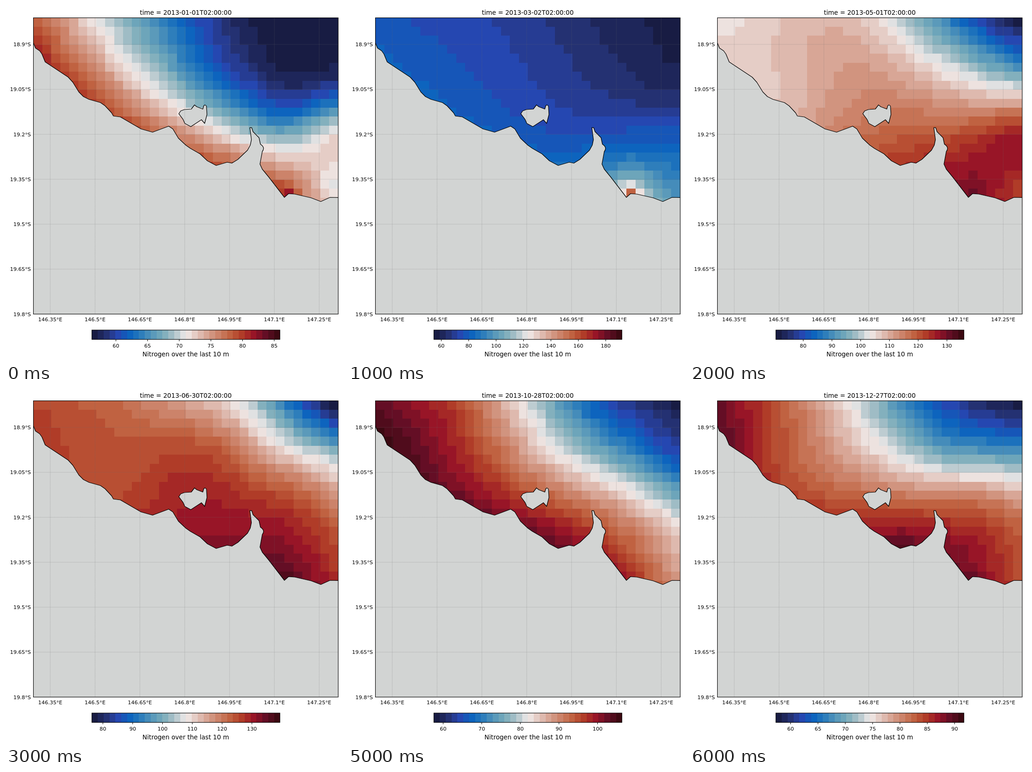
An HTML page with a canvas that plays this animation: 729 by 768 pixels, repeating every 6500 ms.

```html
<!DOCTYPE html>
<html lang="en">
<head>
<meta charset="utf-8">
<title>Nitrogen map</title>
<style>
  html, body { margin: 0; width: 100%; height: 100%; overflow: hidden; background: #fff; }
  canvas { display: block; }
</style>
</head>
<body>
<canvas id="stage" width="729" height="768"></canvas>
<script>
const ctx = document.getElementById('stage').getContext('2d');

const STEP_MS = 500, STEPS = 13;
const MAP = { x: 59.5, y: 25.5, w: 661.3, h: 641, cell: 19.45 };
const BAR = { x: 186.3, y: 701, w: 408, h: 20.3, bins: 32 };
const GRID = 97.25;
const FONT = '"DejaVu Sans", sans-serif';

const PALETTE = ('#181c43 #243070 #2745b0 #0a62be #287bbb #5596ba #79acba #aec3ca #f1eceb ' +
  '#e2c4bb #d59f8d #ca7e63 #be5e3c #af3826 #961327 #620e25 #3c0912').split(' ')
  .map(hex => [1, 3, 5].map(i => parseInt(hex.slice(i, i + 2), 16)));

// Key points as [column, row] of the map grid
const SITES = [
  [0, 0], [8, 0], [16, 0], [24, 0], [33, 0], [19, 5], [26, 5],
  [33, 6], [7, 9], [28, 10], [33, 13], [21, 15], [28, 19], [33, 18]
];
const MOUTH = [28, 19];

// Every second month: colour range, river plume, level (percent) at each key point
const KEYS = [
  { lo: 56.2, hi: 85.9, plume: 13, v: [74, 45, 21, 3, 1, 20, 4, 6, 77, 19, 54, 69, 72, 49] },
  { lo: 54.6, hi: 191.8, plume: 36, v: [17, 14, 11, 6, 2, 11, 7, 4, 19, 11, 18, 20, 36, 28] },
  { lo: 70.5, hi: 135.9, plume: 4, v: [52, 57, 56, 32, 2, 60, 47, 38, 57, 67, 86, 80, 88, 81] },
  { lo: 76.3, hi: 139.4, plume: 3, v: [78, 73, 63, 44, 1, 77, 57, 45, 76, 76, 74, 88, 92, 81] },
  { lo: 68.8, hi: 131.2, plume: 2, v: [88, 79, 53, 16, 2, 57, 37, 20, 87, 51, 48, 82, 86, 54] },
  { lo: 57.6, hi: 106.3, plume: 3, v: [93, 80, 51, 19, 3, 52, 32, 16, 92, 53, 51, 89, 81, 62] },
  { lo: 57.3, hi: 91.7, plume: 2, v: [92, 71, 45, 18, 2, 48, 32, 35, 78, 67, 73, 91, 89, 77] }
];

const COAST = 'M59.5 80L64 91 73 97 78 104 85 121 135 154 145 165 158 186 168 196 180 202 205 209 ' +
  '215 216 229 231 233 238 248 240 293 266 318 273 353 260 362 266 374 286 390 301 400 308 ' +
  '421 320 437 335 456 345 480 338 490 340 503 332 524 312 530 301 532.5 289 529 263 533 263 ' +
  '536 272 549 285 552 299Q563 306 556 315L551 342 556 353 570 370 604 414 ' +
  '613 406 627 407 662 415 683 423 703 414 722 414.3';
const ISLAND = 'M375 233L379 227 387 224 402 223 409 214 414 218 427 223 429 216Q432 212 435 217L436 235 ' +
  '431 254 424 246 401 261 388 254 384 245Z';
const coast = new Path2D(COAST);
const land = new Path2D(COAST + 'V667H59Z');
const island = new Path2D(ISLAND);

const mix = (a, b, f) => a + (b - a) * f;
const distance = (a, b) => Math.hypot(a[0] - b[0], a[1] - b[1]);
const spline = r => r ? r * r * Math.log(r) : 0;

// Gauss-Jordan elimination of an augmented matrix
function solve(rows) {
  const n = rows.length;
  for (let c = 0; c < n; c++) {
    let p = c;
    for (let r = c + 1; r < n; r++) if (Math.abs(rows[r][c]) > Math.abs(rows[p][c])) p = r;
    [rows[c], rows[p]] = [rows[p], rows[c]];
    for (let r = 0; r < n; r++) {
      if (r === c) continue;
      const f = rows[r][c] / rows[c][c];
      for (let k = c; k <= n; k++) rows[r][k] -= f * rows[c][k];
    }
  }
  return rows.map((row, i) => row[n] / row[i]);
}

// Thin plate spline through the key points
function surface(values) {
  const n = SITES.length;
  const rows = SITES.map((s, i) => [...SITES.map(q => spline(distance(s, q))), 1, ...s, values[i]]);
  for (let k = 0; k < 3; k++) {
    rows.push([...SITES.map(s => [1, ...s][k]), 0, 0, 0, 0]);
  }
  const w = solve(rows);
  return p => SITES.reduce((sum, s, i) => sum + w[i] * spline(distance(s, p)),
    w[n] + w[n + 1] * p[0] + w[n + 2] * p[1]);
}

function makeStep(i) {
  const a = KEYS[i >> 1], b = KEYS[(i + 1) >> 1];
  const half = k => mix(a[k], b[k], 0.5);
  return {
    lo: half('lo'), hi: half('hi'), plume: half('plume'),
    level: surface(a.v.map((v, j) => mix(v, b.v[j], 0.5))),
    date: new Date(Date.UTC(2013, 0, 1 + 30 * i, 2)).toISOString().slice(0, 19)
  };
}
const steps = Array.from({ length: STEPS }, (_, i) => makeStep(i));

function binColor(bin) {
  const pos = bin / (BAR.bins - 1) * (PALETTE.length - 1);
  const i = Math.min(Math.floor(pos), PALETTE.length - 2);
  return `rgb(${PALETTE[i].map((c, k) => Math.round(mix(c, PALETTE[i + 1][k], pos - i)))})`;
}

function levelColor(level) {
  return binColor(Math.max(0, Math.min(BAR.bins - 1, Math.floor(level / 100 * BAR.bins))));
}

function text(str, x, y, size, align = 'center') {
  ctx.font = `${size}px ${FONT}`;
  ctx.textAlign = align;
  ctx.fillStyle = '#000';
  ctx.fillText(str, x, y);
}

function line(x1, y1, x2, y2) {
  ctx.beginPath();
  ctx.moveTo(x1, y1);
  ctx.lineTo(x2, y2);
  ctx.stroke();
}

function frame({ x, y, w, h }) {
  ctx.strokeStyle = '#000';
  ctx.lineWidth = 1.1;
  ctx.strokeRect(x, y, w, h);
}

function drawField(step) {
  const edge = (start, i) => Math.round(start + i * MAP.cell);
  for (let r = 0; r < 21; r++) {
    for (let c = 0; c < 34; c++) {
      const plume = step.plume * Math.exp(-0.85 * distance([c, r], MOUTH));
      const x = edge(MAP.x, c), y = edge(MAP.y, r);
      ctx.fillStyle = levelColor(step.level([c, r]) + plume);
      ctx.fillRect(x, y, edge(MAP.x, c + 1) - x, edge(MAP.y, r + 1) - y);
    }
  }
}

function drawMap(step) {
  ctx.save();
  ctx.beginPath();
  ctx.rect(MAP.x, MAP.y, MAP.w, MAP.h);
  ctx.clip();
  drawField(step);
  ctx.fillStyle = '#d2d4d3';
  ctx.fill(land);
  ctx.fill(island);
  ctx.strokeStyle = '#000';
  ctx.lineWidth = 1.25;
  ctx.lineJoin = 'round';
  ctx.stroke(coast);
  ctx.stroke(island);
  ctx.strokeStyle = 'rgba(110,110,110,.45)';
  ctx.lineWidth = 0.7;
  ctx.setLineDash([2, 0.9]);
  for (let i = 0; i < 7; i++) {
    const x = 96 + GRID * i, y = 83 + GRID * i;
    line(x, MAP.y, x, MAP.y + MAP.h);
    line(MAP.x, y, MAP.x + MAP.w, y);
  }
  ctx.restore();

  frame(MAP);
  for (let i = 0; i < 7; i++) {
    text(+(146.35 + 0.15 * i).toFixed(2) + '°E', 96 + GRID * i, 682, 11.33);
    text(+(18.9 + 0.15 * i).toFixed(2) + '°S', 54, 87 + GRID * i, 11.33, 'right');
  }
}

function drawBar({ lo, hi }) {
  const edge = i => Math.round(BAR.x + i * BAR.w / BAR.bins);
  for (let i = 0; i < BAR.bins; i++) {
    ctx.fillStyle = binColor(i);
    ctx.fillRect(edge(i), BAR.y, edge(i + 1) - edge(i), BAR.h);
  }
  frame(BAR);

  const span = hi - lo;
  const gap = span > 100 ? 20 : span > 40 ? 10 : 5;
  for (let v = Math.ceil(lo / gap) * gap; v <= hi; v += gap) {
    const x = BAR.x + (v - lo) / span * BAR.w;
    line(x, BAR.y + BAR.h, x, BAR.y + BAR.h + 4);
    text(v, x, 738.5, 11.33);
  }
  text('Nitrogen over the last 10 m', 390, 757.5, 13.6);
}

function draw(step) {
  ctx.fillStyle = '#fff';
  ctx.fillRect(0, 0, 729, 768);
  text('time = ' + step.date, 390, 19, 13.6);
  drawMap(step);
  drawBar(step);
}

let shown = -1;
const start = performance.now();
function tick() {
  const i = Math.floor((performance.now() - start) / STEP_MS) % STEPS;
  if (i !== shown) draw(steps[shown = i]);
  requestAnimationFrame(tick);
}
tick();
</script>
</body>
</html>
```
